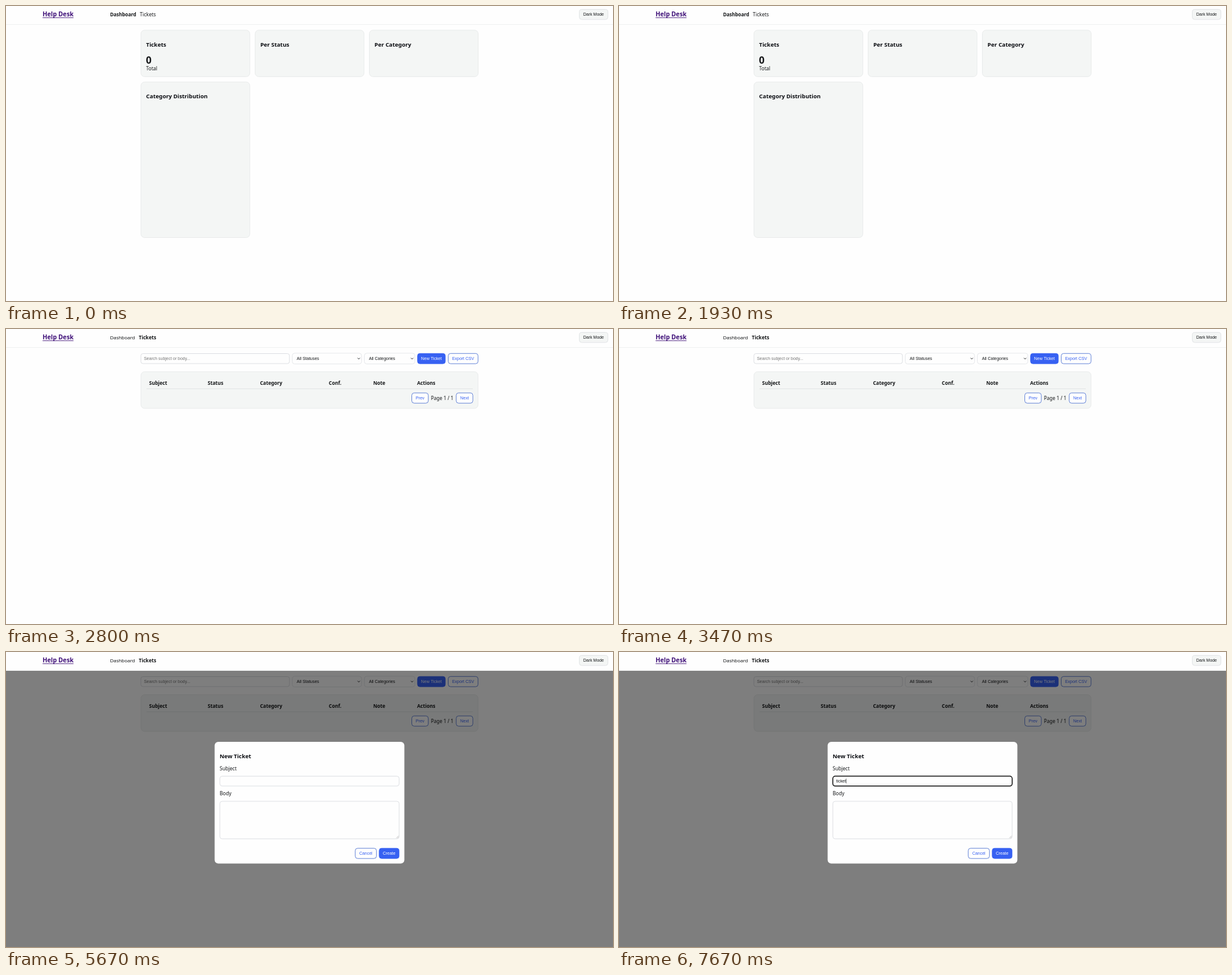
An HTML page with a canvas that plays this animation: 1000x486 px, repeating every 8 s.

```html
<!DOCTYPE html>
<html lang="en">
<head>
<meta charset="utf-8">
<title>Help Desk</title>
<style>
  html, body { margin: 0; width: 100%; height: 100%; overflow: hidden; background: #fefefe; }
  canvas { display: block; width: 1000px; height: 486px; }
</style>
</head>
<body>
<canvas id="stage" width="1000" height="486"></canvas>
<script>
const ctx = document.getElementById("stage").getContext("2d");

const LOOP = 8000;
const TICKETS_AT = 2730, MODAL_AT = 4470, FOCUS_AT = 5730;
const TYPED = "ticket";
const KEY_TIMES = [6270, 6470, 6670, 6870, 7400, 7530];

const INK = "#141618", BLUE = "#3761f2", CARD = "#f4f6f5", EDGE = "#e2e5e6", FIELD = "#d0d3d8";
const UI = '"Noto Sans", "Open Sans", sans-serif';
const CONTROL = '"Liberation Sans", Arial, sans-serif';

function text(label, x, y, { size = 8.1, bold = false, color = INK, family = UI, align = "left" } = {}) {
  ctx.font = `${bold ? "bold " : ""}${size}px ${family}`;
  ctx.textAlign = align;
  ctx.fillStyle = color;
  ctx.fillText(label, x, y);
  return ctx.measureText(label).width;
}

const heading = (label, x, y) => text(label, x, y, { size: 9.36, bold: true, color: "#0b0d12" });

const controlText = (label, x, y, color = INK, align = "left") =>
  text(label, x, y, { size: 6.94, family: CONTROL, color, align });

function box(left, top, right, bottom, radius, fill, stroke, lineWidth = 0.7) {
  ctx.beginPath();
  ctx.roundRect(left, top, right - left, bottom - top, radius);
  if (fill) {
    ctx.fillStyle = fill;
    ctx.fill();
  }
  if (stroke) {
    ctx.strokeStyle = stroke;
    ctx.lineWidth = lineWidth;
    ctx.stroke();
  }
}

function line(points, color, width) {
  ctx.beginPath();
  points.forEach(([x, y]) => ctx.lineTo(x, y));
  ctx.strokeStyle = color;
  ctx.lineWidth = width;
  ctx.stroke();
}

const card = (left, top, right, bottom) => box(left, top, right, bottom, 6, CARD, EDGE);

function button(label, left, top, right, filled) {
  const bottom = top + 16.9;
  box(left, top, right, bottom, 4, filled ? BLUE : "#fefefe", filled ? BLUE : "#4269cf", 0.8);
  controlText(label, (left + right) / 2, top + 10.8, filled ? "#fff" : BLUE, "center");
}

function select(label, left, right) {
  box(left, 39.9, right, 57.6, 4, "#fefefe", "#dcdfe2");
  controlText(label, left + 7.5, 51);
  const x = right - 4.6;
  line([[x - 1.9, 47.6], [x, 49.6], [x + 1.9, 47.6]], INK, 0.9);
}

function header(onTickets) {
  ctx.fillStyle = "#fefefe";
  ctx.fillRect(0, 0, 1000, 31);
  ctx.fillStyle = "#f0f1f1";
  ctx.fillRect(0, 30, 1000, 1);
  const purple = "#3e0f78";
  const width = text("Help Desk", 60.3, 17.4, { size: 10.2, bold: true, color: purple });
  line([[60.3, 19.2], [60.3 + width, 19.2]], purple, 0.9);
  text("Dashboard", 171.4, 17, { size: 7.95, bold: !onTickets });
  text("Tickets", onTickets ? 218.8 : 220.6, 17, { bold: onTickets });
  box(944.5, 5.6, 991.6, 22.2, 4, CARD, "#d9dcde");
  controlText("Dark Mode", 968, 16.4, INK, "center");
}

function dashboard() {
  ["Tickets", "Per Status", "Per Category"].forEach((title, i) => {
    const left = 222.3 + i * 188.15;
    card(left, 39.8, left + 179.4, 116.4);
    heading(title, left + 8.5, 67);
  });
  text("0", 230.6, 94.7, { size: 16.2, bold: true });
  text("Total", 230.8, 106.3);
  card(222.3, 125.2, 401.7, 381.5);
  heading("Category Distribution", 230.8, 152.3);
}

function ticketList() {
  box(222.2, 40.5, 467, 57, 3.5, "#fefefe", FIELD);
  controlText("Search subject or body...", 227.2, 51, "#757575");
  select("All Statuses", 471.6, 585.8);
  select("All Categories", 590.4, 673.6);
  button("New Ticket", 677.9, 40.3, 723.8, true);
  button("Export CSV", 728.5, 40.3, 777.7);

  card(222.3, 70.4, 777.7, 130.8);
  const columns = { Subject: 235.7, Status: 332.2, Category: 418.4, "Conf.": 531.8, Note: 605, Actions: 677.2 };
  for (const [label, x] of Object.entries(columns)) text(label, x, 92, { bold: true });
  line([[231.5, 98.5], [769, 98.5]], "#dde1e1", 0.8);
  button("Prev", 668.5, 105.3, 695.7);
  text("Page 1 / 1", 700, 117, { size: 8 });
  button("Next", 741.7, 105.3, 769.1);
}

function modal(time) {
  ctx.fillStyle = "rgba(0, 0, 0, 0.5)";
  ctx.fillRect(0, 31, 1000, 455);
  box(343.7, 148, 656.3, 348.6, 6, "#fefefe");
  heading("New Ticket", 352, 174.6);
  text("Subject", 352, 194.6);

  const focused = time >= FOCUS_AT;
  box(352.3, 204.6, 647.7, 220.8, 3.8, "#fefefe", focused ? "#101010" : FIELD, focused ? 1.5 : 0.7);
  if (focused) {
    const typed = TYPED.slice(0, KEY_TIMES.filter(t => time >= t).length);
    const caret = 357.7 + controlText(typed, 357.7, 215) + 0.3;
    line([[caret, 208.6], [caret, 216.4]], INK, 0.6);
  }

  text("Body", 352, 236.2);
  box(352.3, 246, 647.7, 307.8, 3.8, "#fefefe", FIELD);
  line([[643, 306.6], [646.8, 302.8]], "#8a8a8a", 0.5);
  line([[645, 306.6], [646.8, 304.8]], "#8a8a8a", 0.5);
  button("Cancel", 575.3, 323.3, 610.3);
  button("Create", 614.8, 323.3, 647.6, true);
}

function draw(time) {
  const onTickets = time >= TICKETS_AT;
  ctx.fillStyle = "#fefefe";
  ctx.fillRect(0, 0, 1000, 486);
  header(onTickets);
  if (onTickets) ticketList();
  else dashboard();
  if (time >= MODAL_AT) modal(time);
}

const start = performance.now();
function tick() {
  draw((performance.now() - start) % LOOP);
  requestAnimationFrame(tick);
}
tick();
</script>
</body>
</html>
```
